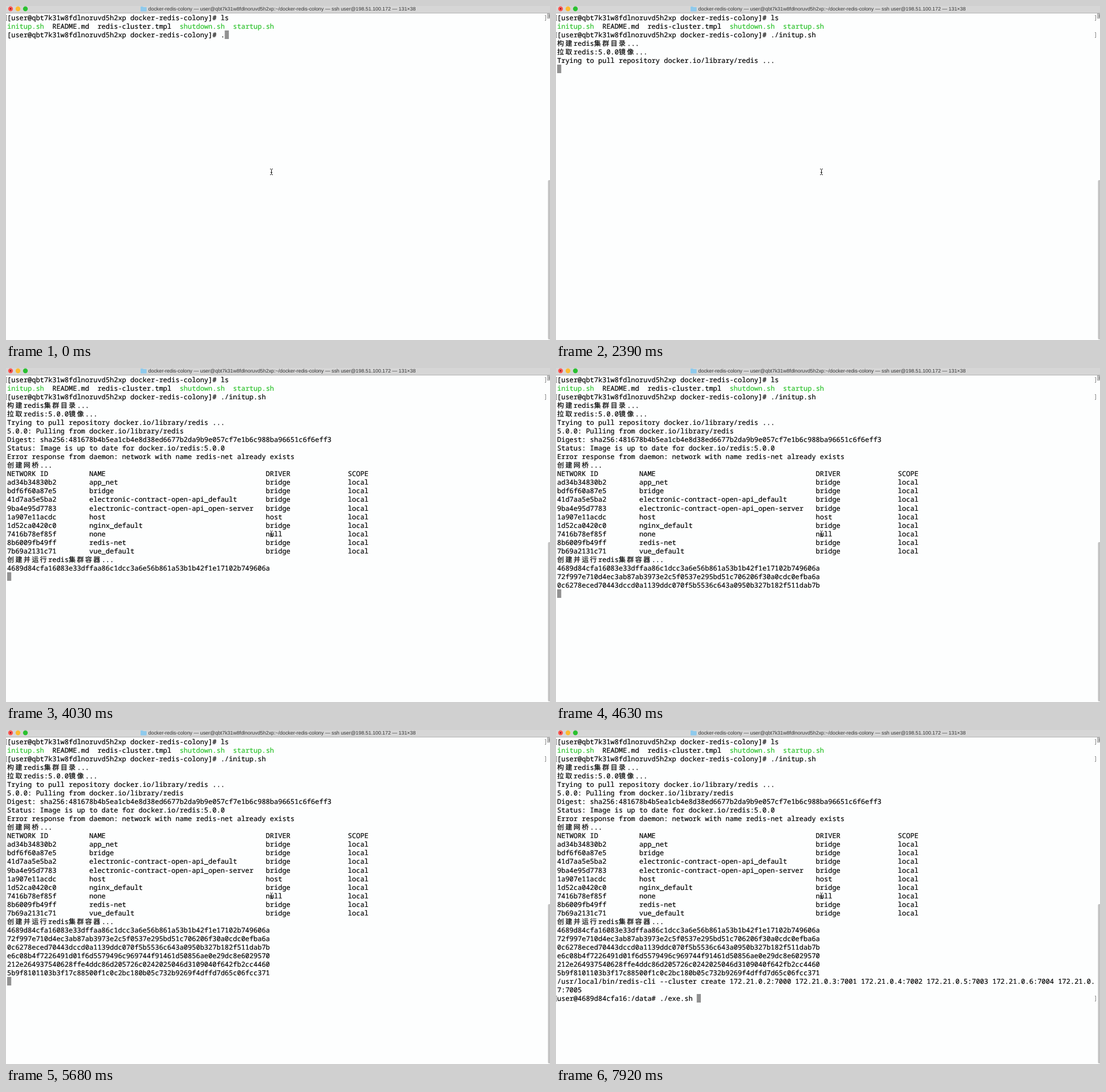
An HTML page for the animation above (8 s loop, 954x587 px).

```html
<!DOCTYPE html>
<html lang="zh-CN">
<head>
<meta charset="utf-8">
<style>
  html, body { margin: 0; height: 100%; overflow: hidden; background: #fdfefe; }
  svg { display: block; width: 100vw; height: 100vh; }
  text { white-space: pre; text-rendering: geometricPrecision; font-variant-ligatures: none; }
  #screen text { font: 500 12px "Noto Sans Mono", monospace; fill: #000; stroke: #000; stroke-width: .2px; }
  #screen .han { font: 400 12px "Noto Sans CJK SC", "Noto Sans CJK", sans-serif; letter-spacing: 2.4px; }
  #screen .exe { fill: #2bc22b; stroke: #2bc22b; }
  #title { font: 8.85px "Liberation Sans", Arial, sans-serif; fill: #333; }
  .mark { fill: none; stroke: #8a8a8a; }
</style>
</head>
<body>
<svg viewBox="0 0 954 587">
  <rect width="954" height="12" fill="#d6d6d6"/>
  <rect y="12" width="954" height="1" fill="#b4b4b4"/>
  <circle cx="8" cy="5" r="4.2" fill="#fb5652"/>
  <circle cx="8" cy="5" r="1.2" fill="#7c1210"/>
  <circle cx="21" cy="5" r="4.2" fill="#fcbc30"/>
  <circle cx="34" cy="5" r="4.2" fill="#2ac131"/>
  <path d="M236 1h4l1 1h5.500v7.500h-10.500z" fill="#8ecaec"/>
  <text id="title" x="484" y="8" text-anchor="middle"></text>
  <g id="screen"></g>
  <path d="M954 13.500h-4.500v8h4.500" fill="#eee" stroke="#999"/>
  <path d="M951 15.500h3M951 17.500h3M951 19.500h3" stroke="#555"/>
  <rect x="950.500" y="306" width="6" height="280" rx="2" fill="#c2c2c2"/>
  <path d="M463 286.500h1.500l1 1 1-1h1.500M465.500 287.500v8M463 296.500h1.500l1-1 1 1h1.500M464 292.500h3" fill="none" stroke="#111"/>
</svg>
<script>
const LOOP = 8000, COL = 7.2;
const user = 'user', host = 'qbt7k31w8fdlnoruvd5h2xp', dir = 'docker-redis-colony';
const shell = `[${user}@${host} ${dir}]# `;
const prompts = { 2: shell, 30: user + '@4689d84cfa16:/data# ' };
const markRows = [0, 2, 30];

const net = (id, name, driver = 'bridge', scope = 'local') =>
  id.padEnd(20) + name.padEnd(43) + driver.padEnd(20) + scope;

const rows = [
  shell + 'ls',
  'initup.sh  README.md  redis-cluster.tmpl  shutdown.sh  startup.sh',
  shell + './initup.sh',
  '构建redis集群目录...',
  '拉取redis:5.0.0镜像...',
  'Trying to pull repository docker.io/library/redis ...',
  '5.0.0: Pulling from docker.io/library/redis',
  'Digest: sha256:481678b4b5ea1cb4e8d38ed6677b2da9b9e057cf7e1b6c988ba96651c6f6eff3',
  'Status: Image is up to date for docker.io/redis:5.0.0',
  'Error response from daemon: network with name redis-net already exists',
  '创建网桥...',
  net('NETWORK ID', 'NAME', 'DRIVER', 'SCOPE'),
  net('ad34b34830b2', 'app_net'),
  net('bdf6f60a87e5', 'bridge'),
  net('41d7aa5e5ba2', 'electronic-contract-open-api_default'),
  net('9ba4e95d7783', 'electronic-contract-open-api_open-server'),
  net('1a907e11acdc', 'host', 'host'),
  net('1d52ca0420c0', 'nginx_default'),
  net('7416b78ef85f', 'none', 'null'),
  net('8b6009fb49ff', 'redis-net'),
  net('7b69a2131c71', 'vue_default'),
  '创建并运行redis集群容器...',
  '4689d84cfa16083e33dffaa86c1dcc3a6e56b861a53b1b42f1e17102b749606a',
  '72f997e710d4ec3ab87ab3973e2c5f0537e295bd51c706206f30a0cdc0efba6a',
  '0c6278eced70443dccd0a1139ddc070f5b5536c643a0950b327b182f511dab7b',
  'e6c08b4f7226491d01f6d5579496c969744f91461d50856ae0e29dc8e6029570',
  '212e264937540628ffe4ddc86d205726c0242025046d3109040f642fb2cc4460',
  '5b9f8101103b3f17c88500f1c0c2bc180b05c732b9269f4dffd7d65c06fcc371',
  '/usr/local/bin/redis-cli --cluster create 172.21.0.2:7000 172.21.0.3:7001 ' +
    '172.21.0.4:7002 172.21.0.5:7003 172.21.0.6:7004 172.21.0.',
  '7:7005'
];

// [start ms, finished rows, typed command, command row marked]
const steps = [
  [0, 2, '.'], [300, 2, './'], [1640, 2, './i'], [1790, 2, './initup.sh ', true],
  [2240, 5, ''], [2390, 6, ''], [3730, 7, ''], [3880, 11, ''], [4030, 23, ''],
  [4330, 24, ''], [4630, 25, ''], [4930, 26, ''], [5380, 27, ''], [5680, 28, ''],
  [5970, 30, ''], [6870, 30, '.'], [7020, 30, './'], [7320, 30, './e'],
  [7620, 30, './ex'], [7770, 30, './ex', true], [7920, 30, './exe.sh ', true]
];

const baseline = i => Math.round(24.9 + 15.04 * i);

function rowText(s, i) {
  let body = s.replace(/[\u4e00-\u9fff]+/g, '<tspan class="han">$&</tspan>');
  if (i === 1) body = body.replace(/\w+\.sh/g, '<tspan class="exe">$&</tspan>');
  return `<text x="2" y="${baseline(i)}">${body}</text>`;
}

function rowMark(i) {
  const y = baseline(i) - 8.5;
  return `<path class="mark" d="M2 ${y}h-1.500v9h1.500M945 ${y}h1.500v9h-1.500"/>`;
}

function draw([, done, typed, marked]) {
  const line = (prompts[done] || '') + typed;
  const marks = markRows.filter(i => i < done || (marked && i === done));
  screen.innerHTML =
    `<rect x="${2 + COL * line.length}" y="${baseline(done) - 12}" width="${COL}" height="15" fill="#919191"/>` +
    [...rows.slice(0, done), line].map(rowText).join('') + marks.map(rowMark).join('');
}

const screen = document.getElementById('screen');
document.getElementById('title').textContent =
  `${dir} — ${user}@${host}:~/${dir} — ssh ${user}@198.51.100.172 — 131×38`;

let shown;
function tick() {
  const t = performance.now() % LOOP;
  const step = steps.findLast(s => s[0] <= t);
  if (step !== shown) draw(shown = step);
  requestAnimationFrame(tick);
}
tick();
</script>
</body>
</html>
```
